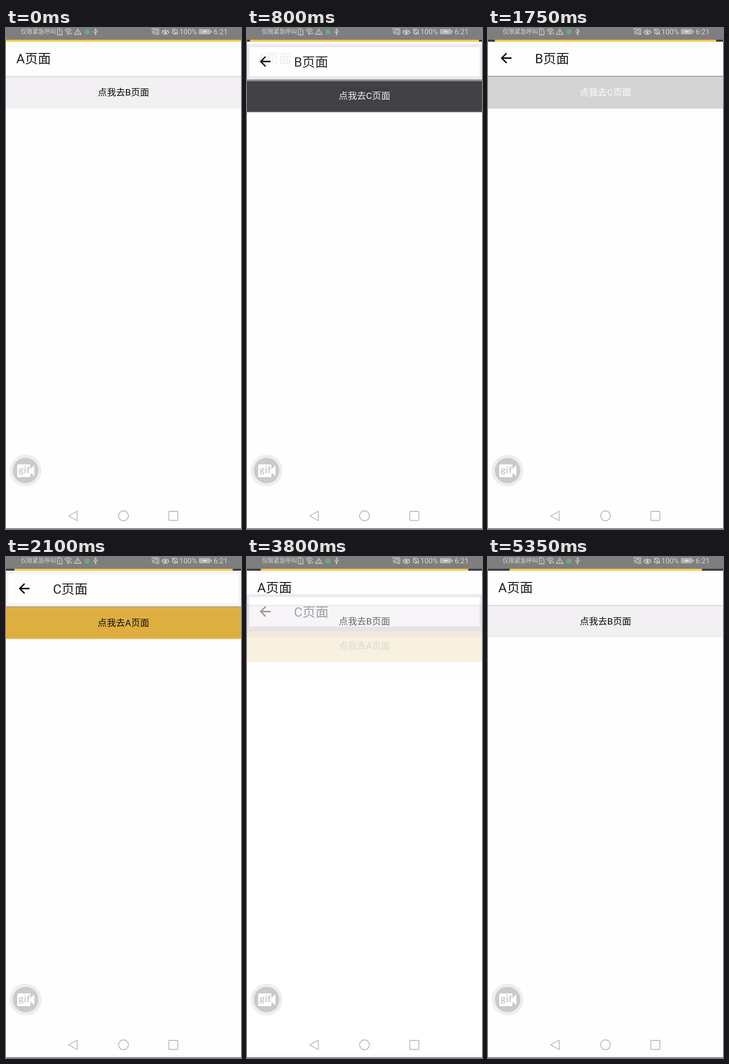
These frames come from a looping animation (480 px wide and 1024 px high, 5.55 s). An HTML page:

```html
<!DOCTYPE html>
<html lang="zh">
<head>
<meta charset="utf-8">
<style>
  html, body { margin: 0; width: 100%; height: 100%; overflow: hidden; background: #fefefe; }
  svg { display: block; width: 480px; height: 1024px; font-family: Roboto, "Noto Sans CJK SC", "Noto Sans CJK", sans-serif; }
  .line { fill: none; stroke-linejoin: round; }
  .title { font-size: 26.67px; fill: #1c1c1c; }
  .label { font-size: 18.67px; text-anchor: middle; }
  .badge { font: 400 20px Lato, sans-serif; letter-spacing: .6px; }
</style>
</head>
<body>
<svg viewBox="0 0 480 1024">
  <rect width="480" height="1024" fill="#fefefe"/>
  <g id="pages"></g>

  <rect width="480" height="24" fill="#7e7e7e"/>
  <g fill="#d6d6d6">
    <text x="30" y="12" font-size="12">仅限紧急呼叫</text>
    <text x="354" y="13" font-size="15">100%</text>
    <text x="424" y="13" font-size="15">6:21</text>
    <circle cx="127" cy="12.500" r="1.600"/>
    <circle cx="325.500" cy="9" r="2.500"/>
    <circle cx="183" cy="13" r="1.500"/>
    <rect x="394" y="2" width="23" height="11" rx="1" fill="#b4b4b4"/>
    <rect x="418" y="5" width="2" height="5"/>
    <path d="M400 7.500l5-1 1-2 1 2 5 1-5 1-1 2-1-2z" fill="#eee"/>
  </g>
  <circle cx="165.500" cy="8" r="5.500" fill="#6fa48c"/>
  <g class="line" stroke="#d6d6d6" stroke-width="1.300">
    <path d="M105 2h6l3.500 3v9h-9.500zM109.500 5v4M109.500 10.500v1.500"/>
    <path d="M119.500 5q7.500-6 15 0M122 8q5-4 10 0M124.500 10.500q2.500-2 5 0M131 10v3M134 9v4"/>
    <path d="M146.500 2l7 11h-14zM146.500 6v4M146.500 11v1"/>
    <path d="M183 13V2l-2 2M183 2l2 2M179.500 6v2.500l3.500 2M186.500 5v2.500l-3.500 2"/>
    <path d="M298 4V2h14v11h-6M298 6.500q6 0 6.500 6.500M298 9.500q3 0 3.500 3.500M302 5h7v5h-3"/>
    <path d="M318 9q7.500-8 15 0-7.500 8-15 0zM319 4l2 1.500M325.500 1.500v2M332 4l-2 1.500"/>
    <path d="M340 11h10V7q0-4-5-4.500-5 .5-5 4.500zM343.500 13h3M339 1.500l12 12"/>
  </g>
  <rect y="24" width="480" height="4" fill="#3b3b43"/>
  <rect id="bar" y="24" height="4" fill="#fac746"/>

  <circle cx="40" cy="904.500" r="32.500" fill="#eeeeef"/>
  <circle cx="40" cy="904.500" r="26" fill="#cacacd"/>
  <path d="M25 892h23q2 0 2 2v7l8-7v22l-8-7v7q0 2-2 2h-23q-2 0-2-2v-22q0-2 2-2z" fill="#fff"/>
  <text class="badge" x="25.500" y="910" fill="#bcbcc0">gif</text>

  <g class="line" stroke="#bdbdbd" stroke-width="1.800">
    <path d="M128 997l17.500-9.500v19.500z"/>
    <circle cx="240" cy="997" r="10"/>
    <rect x="332.500" y="988" width="18.500" height="18.500" rx="1"/>
  </g>
  <rect y="1023" width="480" height="1" fill="#222"/>
</svg>
<script>
const LOOP = 5550, STEP = 50, DROP = 66.7;
const OPEN_MS = 350, CLOSE_MS = 230, RELEASE_MS = 250;
const $ = id => document.getElementById(id);
const clamp = x => Math.min(1, Math.max(0, x));

// press / release: button touch; open / close: page transition; hide: removed from the stack
const pages = [
  { name: "A", next: "B", fill: "#f3f0f4", ink: "#080808", edge: "#d8d4dc", press: 550, release: 660 },
  { name: "B", next: "C", fill: "#343438", ink: "#f0f5ee", edge: "#4a7a5f", press: 1750, release: 1940,
    open: 673, hide: 3586 },
  { name: "C", next: "A", fill: "#e4b13f", ink: "#080808", edge: "#948a72", press: 3450, release: 3710,
    open: 1940, close: 3586, hide: 3816 }
];

$("pages").innerHTML = pages.map(({ name, next, fill, ink, edge, open }) => `
  <g id="page${name}">
    <rect y="28" width="480" height="937" fill="#fefefe"/>
    <g id="button${name}">
      <rect y="99" width="480" height="65.500" fill="${fill}"/>
      ${name === "B" ? `<path d="M0 100h480M0 164.500h480" stroke="${edge}" stroke-width="1.500"/>` : ""}
      <text class="label" x="240" y="138" fill="${ink}">点我去${next}页面</text>
    </g>
    <rect y="98" width="480" height="1" fill="${edge}"/>
    <rect y="99" width="480" height="2" fill="#000" opacity=".05"/>
    <g id="frame${name}">
      <rect y="26" width="480" height="76" fill="#d2ccd9"/>
      <rect x="5" y="32" width="470" height="60" fill="#fefefe"/>
    </g>
    ${open ? `<path class="line" d="M48 61.500H28M38 51.500l-10 10 10 10" stroke="#080808" stroke-width="2.800" style="stroke-linejoin:miter"/>` : ""}
    <text class="title" x="${open ? 96 : 21}" y="72">${name}页面</text>
  </g>`).join("");

// The recording bar shrinks steadily but is only refreshed at these moments.
const refreshes = [0, 50, 150, 350, 400, 550, 700, 900, 1150, 1250, 1550, 1750, 1850, 2050, 2300,
  2500, 2650, 2800, 3100, 3400, 4050, 4200, 4500, 4800, 5050, 5300];

function presence(page, t) {
  if (t >= page.close) return 1 - clamp((t - page.close) / CLOSE_MS) ** 4;
  if (page.open) return 1 - (1 - clamp((t - page.open) / OPEN_MS)) ** 5;
  return 1;
}

function buttonOpacity(page, t) {
  if (t < page.press) return 1;
  const x = clamp((t - page.release) / RELEASE_MS);
  return 0.2 + 0.8 * (x < 0.5 ? 2 * x * x : 1 - 2 * (1 - x) ** 2);
}

function draw(t) {
  for (const page of pages) {
    const p = presence(page, t), group = $("page" + page.name);
    group.style.display = t < page.open || t >= page.hide ? "none" : "";
    group.setAttribute("transform", `translate(0 ${Math.round((1 - p) * DROP)})`);
    group.setAttribute("opacity", p ** 0.7);
    $("frame" + page.name).setAttribute("opacity", p > 0.99 ? 0 : Math.min(1, 4 * (1 - p)));
    $("button" + page.name).setAttribute("opacity", buttonOpacity(page, t));
  }
  const shown = refreshes.filter(r => r <= t).pop();
  const left = Math.round(shown * 0.00822), right = Math.round(480 - shown * 0.0081);
  $("bar").setAttribute("x", left);
  $("bar").setAttribute("width", right - left);
}

const start = performance.now();
function tick() {
  const t = (performance.now() - start) % LOOP;
  draw(Math.floor(t / STEP) * STEP);
  requestAnimationFrame(tick);
}
tick();
</script>
</body>
</html>
```
